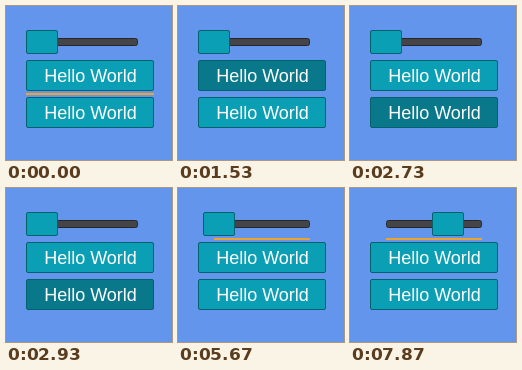
An HTML page for the animation above (8 s loop, 166 by 154 pixels).

```html
<!DOCTYPE html>
<html lang="en">
<head>
<meta charset="utf-8">
<title>Focus and slider</title>
<style>
  html, body { margin: 0; width: 100%; height: 100%; overflow: hidden; background: #6495ed; }
  svg { display: block; }
  text { font: 18px "Liberation Sans", Arial, sans-serif; fill: #fff; text-anchor: middle; }
  .control { fill: #0a9fb4; stroke: #06616e; }
  .pressed { fill: #08788a; }
  .track { fill: #454549; stroke: #27272b; }
  .focus { fill: #eca42c; }
</style>
</head>
<body>
<svg width="166" height="154">
  <rect class="track" x="36.5" y="32.5" width="95" height="7" rx="2"/>
  <rect class="control" id="thumb" x="20.5" y="24.5" width="31" height="23" rx="1.5"/>
  <rect class="control" id="first" x="20.5" y="54.5" width="127" height="30" rx="1.5"/>
  <rect class="control" id="second" x="20.5" y="91.5" width="127" height="30" rx="1.5"/>
  <text x="84.5" y="76">Hello World</text>
  <text x="84.5" y="113">Hello World</text>
  <rect class="focus" id="line" height="2"/>
</svg>
<script>
const LOOP = 8000;
const SLIDER_FOCUS = 3670;
const [thumb, first, second, line] =
  ["thumb", "first", "second", "line"].map(id => document.getElementById(id));

// Alternating press and release times
const firstToggles = [1130, 1200, 1330, 1400, 1530, 1670];
const secondToggles = [2270, 2330, 2470, 2530, 2730, 2800, 2930, 3000];
// Key presses that move the slider by one twentieth of its range
const stepsRight = [5670, 5870, 6000, 6200, 6330, 6800, 6870, 6930, 7070, 7130,
  7270, 7330, 7400, 7470, 7530];
const stepsLeft = [7730, 7870];

const countPast = (times, t) => times.filter(at => t >= at).length;
const isPressed = (toggles, t) => countPast(toggles, t) % 2 === 1;

function draw(t) {
  const pressed1 = isPressed(firstToggles, t);
  const pressed2 = isPressed(secondToggles, t);
  first.classList.toggle("pressed", pressed1);
  second.classList.toggle("pressed", pressed2);

  const onSlider = t >= SLIDER_FOCUS;
  const onSecond = t >= 1930 && t < 3200;
  line.setAttribute("x", onSlider ? 36 : 20);
  line.setAttribute("width", onSlider ? 96 : 128);
  line.setAttribute("y", onSlider ? 50 : onSecond ? 124 : 87);
  line.setAttribute("visibility", pressed1 || pressed2 ? "hidden" : "visible");

  const value = countPast(stepsRight, t) - countPast(stepsLeft, t);
  thumb.setAttribute("x", 20.5 + Math.round(value * 96 / 20));
}

const start = performance.now();
function tick() {
  draw((performance.now() - start) % LOOP);
  requestAnimationFrame(tick);
}
tick();
</script>
</body>
</html>
```
